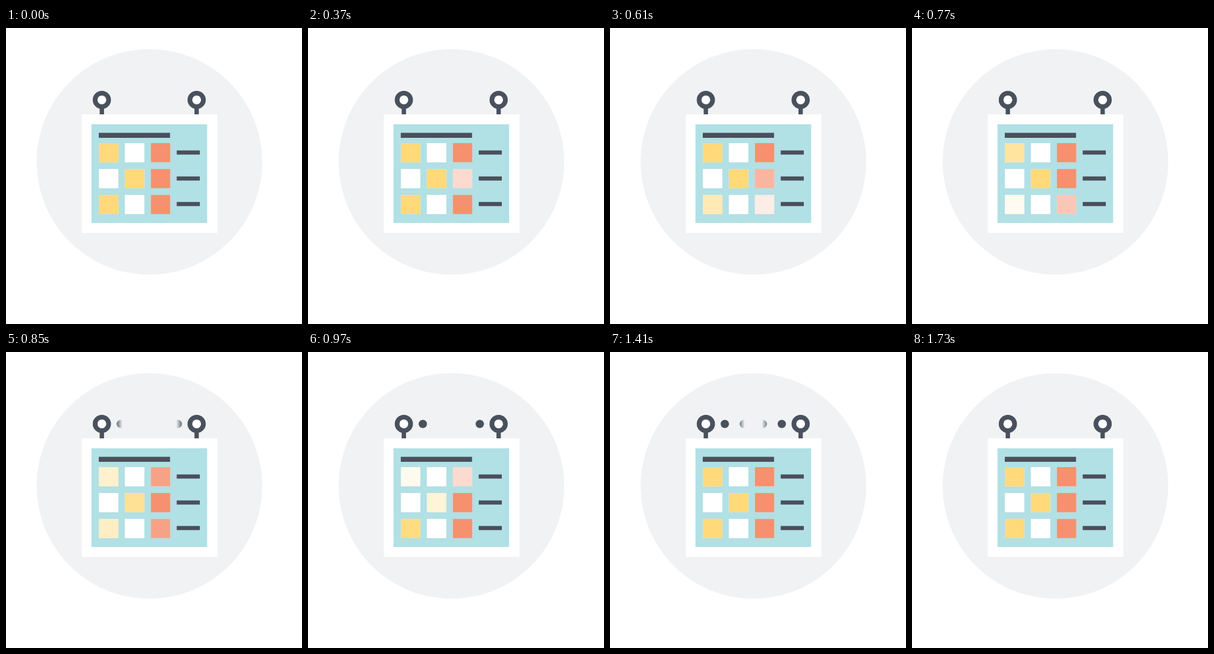
An HTML page that plays this animation: 504x504 px, repeating every 1770 ms.

```html
<!DOCTYPE html>
<html lang="en">
<head>
<meta charset="utf-8">
<title>Calendar</title>
<style>
  html, body { margin: 0; width: 100%; height: 100%; overflow: hidden; background: #fff; }
  svg { display: block; width: 100vw; height: 100vh; }
</style>
</head>
<body>
<svg viewBox="0 0 504 504" xmlns="http://www.w3.org/2000/svg">
  <defs>
    <linearGradient id="wipe" gradientUnits="userSpaceOnUse" x1="176" x2="188" y1="0" y2="0">
      <stop offset="0" stop-color="#49515d"/>
      <stop offset="1" stop-color="#49515d" stop-opacity="0"/>
    </linearGradient>
    <g id="hook">
      <path d="M163.2 134V148" stroke="#49515d" stroke-width="7.4"/>
      <circle cx="163.2" cy="122.4" r="11.5" fill="#fff" stroke="#49515d" stroke-width="8"/>
    </g>
    <g id="dots" fill="url(#wipe)">
      <circle cx="195.5" cy="122.5" r="7.1"/>
      <circle cx="227.8" cy="122.5" r="7.1"/>
    </g>
  </defs>
  <circle cx="244.2" cy="228" r="192" fill="#f0f2f4"/>
  <use href="#hook"/>
  <use href="#hook" transform="translate(161.4 0)"/>
  <use href="#dots"/>
  <use href="#dots" transform="translate(488 0) scale(-1 1)"/>
  <rect x="129" y="147" width="231" height="202" fill="#fff"/>
  <rect x="145.5" y="164" width="197" height="168" fill="#b1e0e5"/>
  <rect x="158" y="178.5" width="121.3" height="8.5" fill="#4a4f5b"/>
  <path d="M290.7 212H330M290.7 256.2H330M290.7 299.8H330" stroke="#4a4f5b" stroke-width="7"/>
  <g id="cells"></g>
</svg>
<script>
const LOOP = 1770, HOLD = 250, STEP = 40, FADE = 240;
const YELLOW = '#ffd97a', RED = '#f6906f';
const grid = document.getElementById('cells');
const wipe = document.getElementById('wipe');

function addRect(col, row, fill) {
  const r = document.createElementNS('http://www.w3.org/2000/svg', 'rect');
  const attrs = { x: 158.2 + col * 44.2, y: 196 + row * 44.1, width: 33.1, height: 32.7, fill };
  for (const key in attrs) r.setAttribute(key, attrs[key]);
  grid.appendChild(r);
  return r;
}

for (let i = 0; i < 9; i++) addRect(i % 3, Math.floor(i / 3), '#fff');

// column, row, colour, moment of full fade
const cells = [
  [0, 0, YELLOW, 940], [2, 0, RED, 1050],
  [1, 1, YELLOW, 1040], [2, 1, RED, 450],
  [0, 2, YELLOW, 743], [2, 2, RED, 650]
].map(([col, row, fill, mid]) => ({ el: addRect(col, row, fill), mid }));

function draw(now) {
  const ms = now % LOOP;
  const t = ms < HOLD ? 0 : HOLD + Math.floor((ms - HOLD) / STEP) * STEP;
  for (const { el, mid } of cells) {
    el.setAttribute('opacity', Math.min(1, Math.abs(t - mid) / FADE));
  }
  // dots are revealed inward, then hidden outward
  const p = Math.max(0, 1 - Math.abs(t - 1250) / 480);
  const edge = 182 + 62 * p;
  wipe.setAttribute('x1', edge - 6);
  wipe.setAttribute('x2', edge + 6);
}

const start = performance.now();
function tick() {
  draw(performance.now() - start);
  requestAnimationFrame(tick);
}
tick();
</script>
</body>
</html>
```
